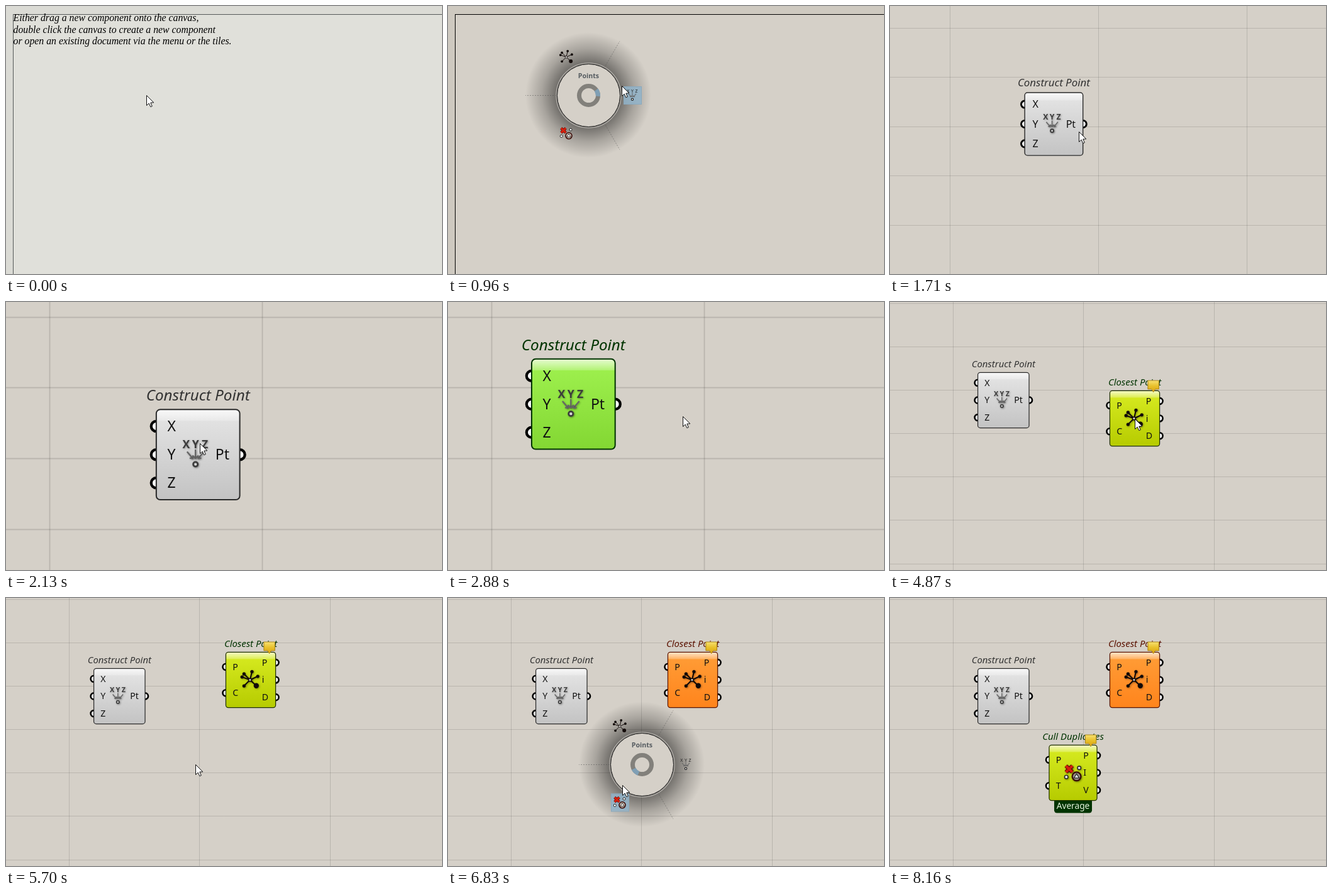
These frames come from a looping animation (693 px wide and 427 px high, 8.75 s). An HTML page with a canvas:

```html
<!DOCTYPE html>
<html lang="en">
<head>
<meta charset="utf-8">
<title>Placing components on a canvas</title>
<style>
html, body { margin: 0; width: 100%; height: 100%; overflow: hidden; background: #d5d0c8; }
canvas { display: block; }
</style>
</head>
<body>
<canvas id="stage" width="693" height="427"></canvas>
<script>
const W = 693, H = 427, LOOP = 8750, BEAT = 70;
const ctx = document.getElementById('stage').getContext('2d');
const SANS = '"Noto Sans", "Open Sans", sans-serif';
const TAU = Math.PI * 2;
const lerp = (a, b, p) => a + (b - a) * p;
const clamp = v => Math.max(0, Math.min(1, v));
const ease = p => p * p * (3 - 2 * p);

// Progress that jumps once per beat, first at start, and arrives after n jumps.
const jumps = (t, start, n) => clamp((Math.floor((t - start) / BEAT) + 1) / n);

// Point reached at time t when each glide continues from the last.
function follow(from, glides, t) {
  return glides.reduce((at, g) => {
    const p = ease(jumps(t, g.start, g.n));
    return { x: lerp(at.x, g.x, p), y: lerp(at.y, g.y, p) };
  }, from);
}
const glide = (start, n, { x, y }) => ({ start, n, x, y });
const shift = (p, x, y) => ({ x: p.x + x, y: p.y + y });

// ---- story ----

const MENUS = [
  { x: 223, y: 142, open: 260, close: 1030 },
  { x: 389, y: 188, open: 3850, close: 4550 },
  { x: 308, y: 265, open: 6290, close: 7160 }
];
const [MENU_A, MENU_B, MENU_C] = MENUS;

const slot = i => ({ x: 70 * Math.cos(i * TAU / 3), y: 70 * Math.sin(i * TAU / 3) });
const pick = (menu, i) => shift(menu, 0.8 * slot(i).x - 3, 0.8 * slot(i).y - 15);

const GRAB = { x: 308, y: 225 }, REST = { x: 301, y: 265 };
const POINTER = [
  glide(480, 5, pick(MENU_A, 0)),
  glide(1030, 15, GRAB),
  glide(2200, 6, shift(GRAB, -106, -81)),
  glide(2750, 2, { x: 373, y: 182 }),
  glide(3030, 9, MENU_B),
  glide(4050, 6, pick(MENU_B, 2)),
  glide(4620, 3, MENU_B),
  glide(4830, 8, shift(MENU_B, 0, -57.5)),
  glide(5440, 3, REST),
  glide(6090, 1, MENU_C),
  glide(6620, 4, pick(MENU_C, 1)),
  glide(7160, 3, shift(MENU_C, -10, 13)),
  glide(7430, 5, shift(MENU_C, -27, 26)),
  glide(7960, 3, { x: 526, y: 405 })
];

const VIEWS = [
  { z: 1, x: -31.7, y: -55.2 },
  { z: 2.2533, x: -268.7, y: -201.2 },
  { z: 1.3833, x: -107, y: -67 }
];

function zoomView(a, b, p) {
  const z = a.z * Math.pow(b.z / a.z, p), s = (z - a.z) / (b.z - a.z);
  return { z, x: lerp(a.x, b.x, s), y: lerp(a.y, b.y, s) };
}

function viewAt(t) {
  return t < 2500
    ? zoomView(VIEWS[0], VIEWS[1], jumps(t, 1380, 9))
    : zoomView(VIEWS[1], VIEWS[2], jumps(t, 2960, 9));
}

const SKINS = {
  grey: { top: '#e6e6e6', low: '#c3c3c3', edge: '#2b2b2b', label: '#333' },
  green: { top: '#a0f250', low: '#83d733', edge: '#003300', label: '#003300' },
  lime: { top: '#d8ec22', low: '#b6cb00', edge: '#203000', label: '#003300' },
  orange: { top: '#ff9e38', low: '#ff841c', edge: '#5a1400', label: '#5c1200' }
};

const NODES = {
  construct: { name: 'Construct Point', w: 58.9, ins: ['X', 'Y', 'Z'], outs: ['Pt'], icon: xyzIcon, dx: -1.8 },
  closest: { name: 'Closest Point', w: 57.2, ins: ['P', 'C'], outs: ['P', 'i', 'D'], icon: hubIcon, dx: -0.8, warn: true },
  cull: { name: 'Cull Duplicates', w: 55, ins: ['P', 'T'], outs: ['P', 'I', 'V'], icon: cullIcon, dx: 0, warn: true, tag: 'Average' }
};

// ---- drawing helpers ----

function text(s, x, y, font, color, align = 'left') {
  ctx.font = `${font} ${SANS}`;
  ctx.fillStyle = color;
  ctx.textAlign = align;
  ctx.fillText(s, x, y);
}

function dot(x, y, r, fill, stroke, width) {
  ctx.beginPath();
  ctx.arc(x, y, r, 0, TAU);
  if (fill) { ctx.fillStyle = fill; ctx.fill(); }
  if (stroke) { ctx.strokeStyle = stroke; ctx.lineWidth = width; ctx.stroke(); }
}

function line(x1, y1, x2, y2, color, width) {
  ctx.beginPath();
  ctx.moveTo(x1, y1);
  ctx.lineTo(x2, y2);
  ctx.strokeStyle = color;
  ctx.lineWidth = width;
  ctx.stroke();
}

function shape(points, fill, stroke, width) {
  ctx.beginPath();
  points.forEach(([x, y]) => ctx.lineTo(x, y));
  ctx.closePath();
  ctx.fillStyle = fill;
  ctx.fill();
  ctx.strokeStyle = stroke;
  ctx.lineWidth = width;
  ctx.stroke();
}

function fade(y1, y2, ...colors) {
  const g = ctx.createLinearGradient(0, y1, 0, y2);
  colors.forEach((c, i) => g.addColorStop(i / (colors.length - 1), c));
  return g;
}

function at({ x, y }, paint) {
  ctx.save();
  ctx.translate(x, y);
  paint();
  ctx.restore();
}

// ---- icons ----

function xyzIcon(bold) {
  const ink = bold ? '#3c3c3c' : '#222';
  [...'XYZ'].forEach((c, i) =>
    text(c, (i - 1) * 6.6, -4.3, bold ? 'bold 7.8px' : '7px', ink, 'center'));
  for (const lean of [-0.7, 0, 0.7]) {
    ctx.save();
    ctx.translate(lean * 2.6, 2.8);
    ctx.rotate(lean);
    line(0, -6.4, 0, 0, '#666', 1);
    for (const side of [-1.5, 1.5]) line(0, 0, side, -1.8, '#666', 1);
    ctx.restore();
  }
  dot(0, 6.8, 1.6, '#fff', ink, 1.2);
}

function hubIcon(bold) {
  const ink = '#120a08';
  for (const deg of [-160, -135, -77, -25, 43, 135]) {
    const a = deg * TAU / 360, x = 9.8 * Math.cos(a), y = 9.8 * Math.sin(a);
    line(0, 0, x, y, ink, bold ? 1.5 : 1);
    dot(x, y, deg === 43 ? 3 : 1.9, ink);
  }
  dot(0, 0, 1.6, '#fff', ink, 0.9);
}

function cullIcon() {
  dot(7, -5.6, 2, '#fff', '#222', 1);
  dot(-7.8, 4.8, 2, '#fff', '#222', 1);
  dot(4, 4.2, 5, '#b9aaa0', '#3a0c08', 1.6);
  shape([[4, 1.2], [7, 6], [1, 6]], '#fff', '#222', 0.8);
  for (const [color, width] of [['#5c0800', 4.4], ['#d8200e', 3]])
    for (const s of [-1, 1]) line(-4.5 - 3.7 * s, -8, -4.5 + 3.7 * s, -0.8, color, width);
}

function balloon(x, y) {
  const half = [[6.3, -13], [6.3, -3], [2.2, -3], [0, 0.4]];
  const mirror = half.map(([px, py]) => [-px, py]).reverse();
  ctx.lineJoin = 'round';
  at({ x, y }, () => shape([...half, ...mirror],
    fade(-13, 0, '#f7e070', '#e8c02a', '#dca414'), '#a98212', 0.7));
}

// ---- parts ----

function node(kind, pos, z, skinName) {
  const n = NODES[kind], skin = SKINS[skinName];
  const hw = n.w / 2, hh = 31.9;
  const rowY = (list, i) => (i - (list.length - 1) / 2) * (list.length === 2 ? 30 : 20);
  const port = (x, y) => dot(x, y, 3.6, '#fff', '#000', 1.9);
  ctx.save();
  ctx.translate(pos.x, pos.y);
  ctx.scale(z, z);

  n.ins.forEach((_, i) => port(-hw, rowY(n.ins, i)));
  n.outs.forEach((_, i) => port(hw, rowY(n.outs, i)));

  if (n.tag) {
    ctx.beginPath();
    ctx.roundRect(-21.7, hh - 2, 43.4, 16.3, 3);
    ctx.fillStyle = skin.label;
    ctx.fill();
    text(n.tag, 0, hh + 10, '9.9px', '#e4f2dc', 'center');
  }

  ctx.beginPath();
  ctx.roundRect(-hw, -hh, n.w, hh * 2, 2.8);
  ctx.fillStyle = fade(-hh, hh, skin.top, skin.low);
  ctx.fill();
  ctx.save();
  ctx.clip();
  ctx.fillStyle = fade(-hh, -hh + 8, 'rgba(255,255,255,.75)', 'rgba(255,255,255,.22)');
  ctx.fillRect(-hw, -hh, n.w, 8);
  ctx.restore();
  ctx.strokeStyle = skin.edge;
  ctx.lineWidth = 0.9;
  ctx.stroke();

  const outX = hw - (n.outs.length === 1 ? 17.2 : 15.7);
  n.ins.forEach((s, i) => text(s, -hw + 7.8, rowY(n.ins, i) + 3.6, '10.2px', '#111'));
  n.outs.forEach((s, i) => text(s, outX, rowY(n.outs, i) + 3.6, '10.2px', '#111'));
  text(n.name, 0, -hh - 6.2, 'italic 10.75px', skin.label, 'center');

  at({ x: n.dx, y: 0 }, () => {
    ctx.shadowColor = 'rgba(0,0,0,.35)';
    ctx.shadowBlur = 3;
    ctx.shadowOffsetX = ctx.shadowOffsetY = 1;
    n.icon(true);
  });
  if (n.warn) balloon(hw - 7.2, -hh + 1.2);
  ctx.restore();
}

function radialMenu(menu, mouse) {
  const dx = mouse.x - menu.x, dy = mouse.y - menu.y, angle = Math.atan2(dy, dx);
  const active = Math.hypot(dx, dy) > 18;
  const hot = active ? (Math.round(angle / (TAU / 3)) + 3) % 3 : -1;

  at(menu, () => {
    const g = ctx.createRadialGradient(0, 0, 48, 0, 0, 100);
    g.addColorStop(0, 'rgba(0,0,0,.5)');
    g.addColorStop(0.5, 'rgba(0,0,0,.21)');
    g.addColorStop(1, 'rgba(0,0,0,0)');
    dot(0, 0, 100, g);

    ctx.setLineDash([2, 2]);
    for (let i = 0; i < 3; i++) {
      const a = (i + 0.5) * TAU / 3, c = Math.cos(a), s = Math.sin(a);
      line(51 * c, 51 * s + 0.5, 100 * c, 100 * s + 0.5, 'rgba(70,70,70,.45)', 1);
    }
    ctx.setLineDash([]);

    dot(0.5, 0.5, 51.6, null, 'rgba(235,232,226,.5)', 1.2);
    dot(0.5, 0.5, 50, '#d5d0c8', '#1c1c1c', 1);
    dot(0.5, 0.5, 15, null, '#82807b', 7);
    if (active) {
      ctx.beginPath();
      ctx.arc(0.5, 0.5, 15, angle - 0.36, angle + 0.36);
      ctx.strokeStyle = '#7f9fb5';
      ctx.lineWidth = 7;
      ctx.stroke();
    }
    text('Points', 0.5, -27, 'bold 10.6px', active ? '#555b60' : '#3a3a3a', 'center');

    [xyzIcon, cullIcon, hubIcon].forEach((icon, i) => at(slot(i), () => {
      if (i === hot) {
        ctx.fillStyle = 'rgba(146,180,203,.85)';
        ctx.fillRect(-14, -14, 28, 28);
        ctx.strokeStyle = '#8aa9be';
        ctx.lineWidth = 1;
        ctx.strokeRect(-13.5, -13.5, 28, 28);
      }
      icon(false);
    }));
  });
}

function pointer({ x, y }) {
  ctx.lineJoin = 'miter';
  at({ x: Math.round(x) + 0.5, y: Math.round(y) + 0.5 }, () => shape(
    [[0, 0], [0, 16], [3.7, 12.6], [6.3, 18.2], [8.8, 17.2], [6.3, 11.6], [11.3, 11.4]],
    '#fff', '#111', 1));
}

function sheetEdge(v) {
  const x = Math.round(v.x + 42.7 * v.z), y = Math.round(v.y + 68.2 * v.z);
  ctx.fillStyle = '#cec9c0';
  ctx.fillRect(0, 0, W, y);
  ctx.fillRect(0, 0, x, H);
  ctx.strokeStyle = '#000';
  ctx.lineWidth = 1;
  ctx.strokeRect(x + 0.5, y + 0.5, 3000, 3000);
}

function grid(v) {
  const color = `rgba(0,0,0,${0.13 * clamp((v.z - 1) * 3)})`;
  const width = v.z > 1.8 ? 1.8 : 1;
  const mod = (p, d) => (p % d + d) % d;
  const dx = 150 * v.z, dy = 50 * v.z;
  for (let x = mod(v.x, dx); x < W; x += dx) line(Math.floor(x) + 0.5, 0, Math.floor(x) + 0.5, H, color, width);
  for (let y = mod(v.y, dy); y < H; y += dy) line(0, Math.floor(y) + 0.5, W, Math.floor(y) + 0.5, color, width);
}

function hint() {
  ctx.fillStyle = 'rgba(244,251,251,.35)';
  ctx.fillRect(0, 0, W, H);
  ctx.font = 'italic 15.8px "Liberation Serif", serif';
  ctx.fillStyle = '#000';
  ctx.textAlign = 'left';
  ['Either drag a new component onto the canvas,',
   'double click the canvas to create a new component',
   'or open an existing document via the menu or the tiles.'
  ].forEach((s, i) => ctx.fillText(s, 11.5, 24 + i * 18.5));
}

function draw(t) {
  const v = viewAt(t), mouse = follow(MENU_A, POINTER, t);
  ctx.fillStyle = '#d5d0c8';
  ctx.fillRect(0, 0, W, H);
  grid(v);
  if (t < 2100) sheetEdge(v);
  if (t < 960) hint();

  if (t >= MENU_A.close) {
    const p = follow({ x: 254.7, y: 197.2 }, [glide(2200, 6, { x: 207.7, y: 161.5 })], t);
    node('construct', { x: v.x + p.x * v.z, y: v.y + p.y * v.z }, v.z, t >= 2200 && t < 4830 ? 'green' : 'grey');
  }
  if (t >= MENU_B.close) {
    const p = follow(MENU_B, [glide(4830, 8, shift(MENU_B, 0, -57.5))], t);
    node('closest', p, v.z, t >= 4830 && t < 5890 ? 'lime' : 'orange');
  }
  if (t >= MENU_C.close) {
    const p = follow(MENU_C, [glide(7430, 5, shift(MENU_C, -17, 13.5))], t);
    node('cull', p, v.z, t >= 7430 ? 'lime' : 'orange');
  }

  for (const m of MENUS) if (t >= m.open && t < m.close) radialMenu(m, mouse);
  if (t < 8160) pointer(mouse);
}

const start = performance.now();
function tick() {
  draw((performance.now() - start) % LOOP);
  requestAnimationFrame(tick);
}
tick();
</script>
</body>
</html>
```
